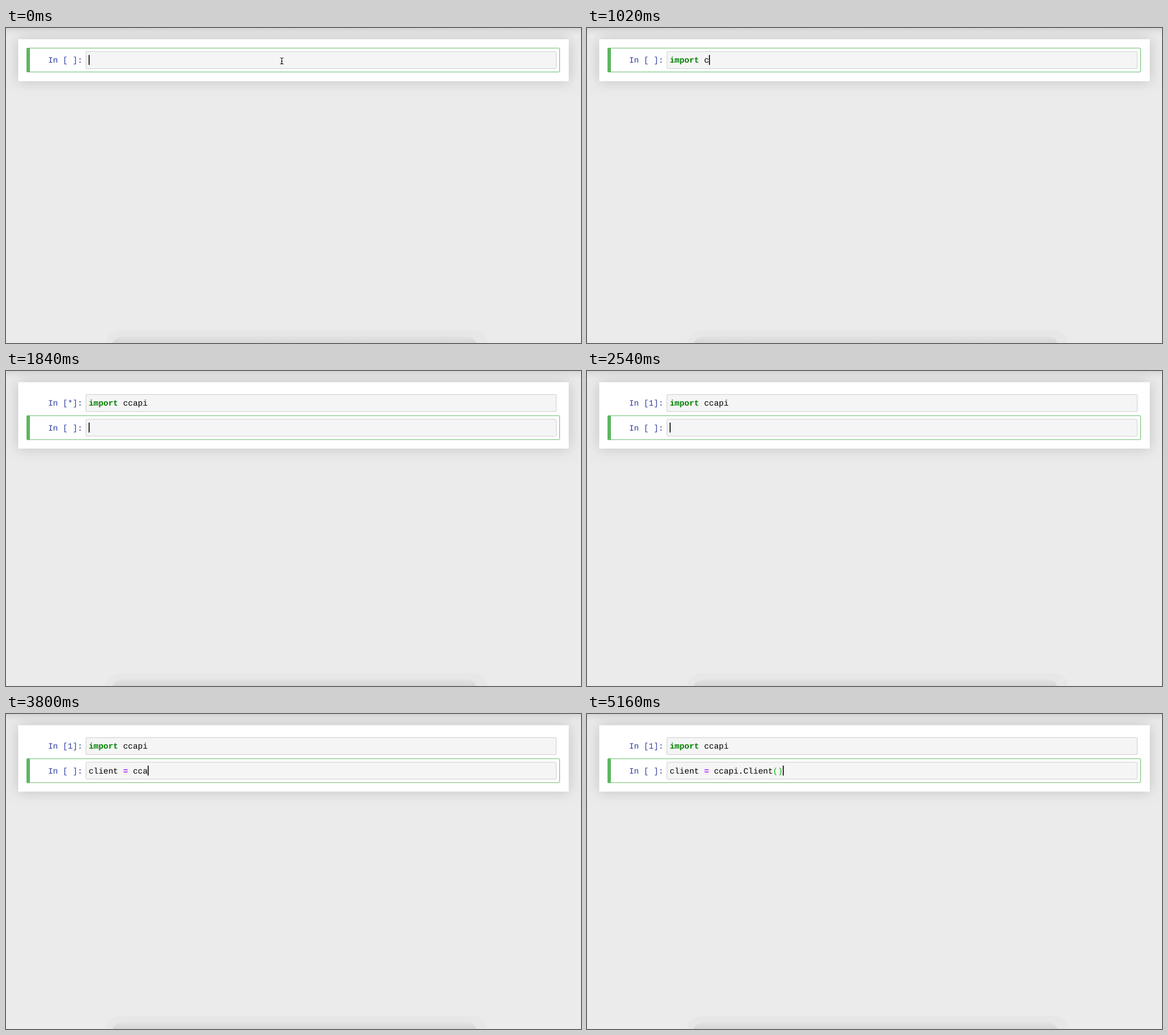
These frames come from a looping animation (1010x555 px, 5440 ms). An HTML page:

```html
<!DOCTYPE html>
<html lang="en">
<head>
<meta charset="utf-8">
<title>Notebook typing</title>
<style>
  html, body { margin: 0; width: 100%; height: 100%; overflow: hidden; background: #ebebeb; }
  svg { display: block; width: 100vw; height: 100vh; }
  text { font: 14.4px "Liberation Mono", monospace; white-space: pre; text-rendering: geometricPrecision; }
  .prompt { fill: #303f9f; }
  .keyword { fill: #008000; font-weight: bold; }
  .operator { fill: #aa22ff; font-weight: bold; }
  .bracket { fill: #00bb00; }
  .card { fill: #fff; filter: drop-shadow(0 0 12px rgba(87, 87, 87, .28)); }
  .input { fill: #f5f5f5; stroke: #cfcfcf; }
  .frame { fill: none; stroke: #66bb6a; }
  .bar { fill: #5cb660; }
</style>
</head>
<body>
<svg viewBox="0 0 1010 555" preserveAspectRatio="none">
  <defs>
    <linearGradient id="top" x2="0" y2="1">
      <stop offset="0" stop-color="#d6d6d6"/>
      <stop offset=".45" stop-color="#e3e3e3"/>
      <stop offset="1" stop-color="#ebebeb"/>
    </linearGradient>
    <linearGradient id="dock" x2="0" y2="1">
      <stop offset="0" stop-color="#e3e3e3"/>
      <stop offset="1" stop-color="#d6d6d6"/>
    </linearGradient>
  </defs>
  <rect width="1010" height="555" fill="#ebebeb"/>
  <rect width="1010" height="14" fill="url(#top)"/>
  <path d="M175 555Q180 532 206 532H818Q842 532 845 555Z" fill="#e7e7e7"/>
  <path d="M187 555Q192 543 212 543H806Q822 543 826 555Z" fill="url(#dock)"/>
  <rect id="card" class="card" x="21.5" y="19.7" width="967" height="74"/>
  <g id="cells"></g>
  <g id="active">
    <rect class="frame" x="36.5" y="35.4" width="936" height="42.1" rx="1.5"/>
    <rect class="bar" x="36.2" y="35" width="5.8" height="43" rx="1"/>
  </g>
  <rect id="caret" y="47.5" width="1.6" height="17.5"/>
  <g id="mouse" fill="none">
    <path id="beam" d="M481.5 52.5Q484.5 52.5 484.5 54.5Q484.5 52.5 487.5 52.5M484.5 54V62M481.5 63.5Q484.5 63.5 484.5 61.5Q484.5 63.5 487.5 63.5M483 58.5H486" stroke="#fff" stroke-width="2.6"/>
    <use href="#beam"/>
  </g>
</svg>
<script>
const LOOP = 5440, STEP = 43.4, CHAR = 8.64, LEFT = 145.2;
const RUN = 1840, DONE = 2540, OPEN = 5120, CLOSE = 5160;
const $ = id => document.getElementById(id);

// Each key press reveals one more character.
const lines = [
  { text: "import ccapi",
    keys: [380, 500, 580, 620, 700, 820, 880, 1020, 1120, 1220, 1320, 1420] },
  { text: "client = ccapi.Client()",
    keys: [2860, 2920, 3060, 3120, 3200, 3260, 3340, 3420, 3480, 3560,
           3680, 3800, 3880, 3940, 4100, 4340, 4440, 4520, 4600, 4700, 4780,
           OPEN, OPEN] }
];
const caretOff = [[260, 380], [1740, RUN], [2140, 2460], [2780, 2860]];

$("cells").innerHTML = lines.map((_, i) => `<g transform="translate(0 ${i * STEP})">
  <rect class="input" x="140.5" y="41.5" width="826" height="30" rx="1.5"/>
  <text class="prompt" x="73.9" y="61.3"></text>
  <text class="code" x="${LEFT}" y="61.2"></text></g>`).join("");
const cells = [...$("cells").children];

const tint = code => code.replace(/\bimport\b|=|[()]+/g, word => {
  const kind = word === "import" ? "keyword" : word === "=" ? "operator" : "bracket";
  return `<tspan class="${kind}">${word}</tspan>`;
});

const show = (node, on) => node.setAttribute("visibility", on ? "visible" : "hidden");

function draw(t) {
  const row = t < RUN ? 0 : 1;
  const mark = t < RUN ? " " : t < DONE ? "*" : "1";
  const counts = lines.map(line => line.keys.filter(k => k <= t).length);

  cells.forEach((cell, i) => {
    const [, prompt, code] = cell.children;
    prompt.textContent = `In [${i ? " " : mark}]:`;
    code.innerHTML = tint(lines[i].text.slice(0, counts[i]));
  });
  cells[1].style.display = row ? "" : "none";

  $("card").setAttribute("height", 74 + row * 43);
  $("active").setAttribute("transform", `translate(0 ${row * STEP})`);

  // The closing bracket is inserted ahead of the caret, then typed over.
  const column = counts[row] - (t >= OPEN && t < CLOSE ? 1 : 0);
  $("caret").setAttribute("x", LEFT + column * CHAR);
  $("caret").setAttribute("y", 47.5 + row * STEP);
  show($("caret"), !caretOff.some(([a, b]) => t >= a && t < b));
  show($("mouse"), t < 420);
}

$("mouse").lastElementChild.remove();
const beam = $("beam").cloneNode();
beam.removeAttribute("id");
beam.setAttribute("stroke", "#111");
beam.setAttribute("stroke-width", "1.1");
$("mouse").append(beam);

const start = performance.now();
function tick() {
  draw((performance.now() - start) % LOOP);
  requestAnimationFrame(tick);
}
tick();
</script>
</body>
</html>
```
